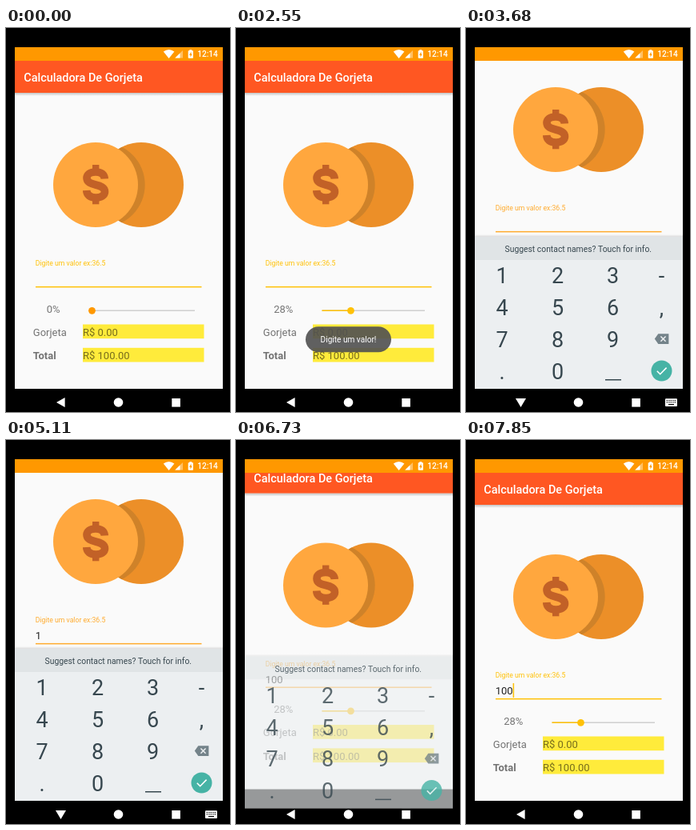
These frames come from a looping animation (280x480 px, 8000 ms). An HTML page with a canvas:

```html
<!DOCTYPE html>
<html lang="pt">
<head>
<meta charset="utf-8">
<title>Calculadora De Gorjeta</title>
<style>
  html, body { margin: 0; width: 100%; height: 100%; overflow: hidden; background: #000; }
  canvas { display: block; width: 280px; height: 480px; }
</style>
</head>
<body>
<canvas id="stage"></canvas>
<script>
const W = 280, H = 480, LOOP = 8000;
const AMBER = '#ffc107', ORANGE = '#ff9800', GREY = 'rgba(0,0,0,.54)', INK = '#37474f';
const canvas = document.getElementById('stage');
const ratio = window.devicePixelRatio || 1;
canvas.width = W * ratio;
canvas.height = H * ratio;
const c = canvas.getContext('2d');

// Timeline, in ms
const SLIDE_AT = 1170;
const OPEN_PAN = [3290, 3610], OPEN_KEYS = [3340, 3560];
const CLOSE_PAN = [6590, 6850], CLOSE_KEYS = [6640, 6820];
const TOAST_IN = [1240, 1740], TOAST_OUT = [3300, 3610];
const PAN = 69, KEYS_DROP = 19;
const CURSOR_ON = [[50, 550], [1050, 1550], [2050, 2550], [3050, 3620], [4120, 5110],
                   [5420, 6300], [6850, 7350], [7850, 8000]];
const PRESSES = [['1', 4490, 4610], ['0', 5300, 5420], ['0', 5740, 5800]];
const COLS = [45, 114.5, 183.5, 244.5], ROWS = [309.5, 349.5, 389, 429];
const KEYS = ['123-', '456,', '789 ', '.0  '];

const span = (t, [a, b]) => Math.min(1, Math.max(0, (t - a) / (b - a)));
const within = (t, [a, b]) => t >= a && t < b;
const mix = (a, b, u) => a + (b - a) * u;

function rect(x, y, w, h, fill) {
  c.fillStyle = fill;
  c.fillRect(x, y, w, h);
}

function disc(x, y, r, fill) {
  c.fillStyle = fill;
  c.beginPath();
  c.arc(x, y, r, 0, Math.PI * 2);
  c.fill();
}

function round(x, y, w, h, r, fill) {
  c.fillStyle = fill;
  c.beginPath();
  c.roundRect(x, y, w, h, r);
  c.fill();
}

function poly(fill, ...pts) {
  c.fillStyle = fill;
  c.beginPath();
  pts.forEach(([x, y]) => c.lineTo(x, y));
  c.closePath();
  c.fill();
}

function line(color, width, ...pts) {
  c.strokeStyle = color;
  c.lineWidth = width;
  c.beginPath();
  pts.forEach(([x, y]) => c.lineTo(x, y));
  c.stroke();
}

function text(s, x, y, size, fill, align = 'left', weight = 400) {
  c.font = `${weight} ${size}px Roboto, sans-serif`;
  c.textAlign = align;
  c.fillStyle = fill;
  c.fillText(s, x, y);
}

function shade(y, h, alpha) {
  const g = c.createLinearGradient(0, y, 0, y + h);
  const down = h > 0;
  g.addColorStop(0, `rgba(0,0,0,${alpha})`);
  g.addColorStop(1, 'rgba(0,0,0,0)');
  rect(11, down ? y : y + h, 260, Math.abs(h), g);
}

function statusBar() {
  rect(11, 24, 260, 17, ORANGE);
  c.fillStyle = '#fff';
  c.beginPath();
  c.moveTo(203.6, 38);
  c.lineTo(196.8, 29.6);
  c.quadraticCurveTo(203.6, 24.6, 210.4, 29.6);
  c.fill();
  poly('rgba(255,255,255,.4)', [221, 28], [221, 37.6], [211.3, 37.6]);
  poly('#fff', [217.5, 31.5], [217.5, 37.6], [211.3, 37.6]);
  rect(229.3, 27.2, 3, 2, '#fff');
  round(227.7, 28.2, 6.3, 9.6, .8, '#fff');
  poly(ORANGE, [231.4, 29.8], [229, 33.7], [230.5, 33.7], [230.5, 36.4], [232.8, 32.5], [231.4, 32.5]);
  text('12:14', 239.2, 36.4, 10.1, '#fff', 'left', 500);
}

function navBar(typing) {
  if (typing) {
    poly('#fff', [62, 463], [75, 463], [68.5, 474]);
    round(249, 463.3, 15, 9.6, 1, '#fff');
    for (let row = 0; row < 2; row++)
      for (let i = 0; i < 5; i++) rect(250.7 + i * 2.5, 465 + row * 2.3, 1.3, 1.2, '#000');
    rect(253, 470, 7, 1.2, '#000');
  } else {
    poly('#fff', [63, 468], [73.6, 462], [73.6, 474]);
  }
  disc(140.5, 468, 5.8, '#fff');
  rect(207.3, 463, 10.6, 10.6, '#fff');
}

function coins() {
  disc(169, 196, 53, '#ec8f28');
  c.save();
  c.beginPath();
  c.arc(169, 196, 53, 0, Math.PI * 2);
  c.clip();
  disc(120.7, 196, 53, '#cf8229');
  c.restore();
  disc(112, 196, 53, '#ffa73e');
  const brown = '#c26127';
  c.strokeStyle = brown;
  c.lineWidth = 9.6;
  c.stroke(new Path2D('M123.3 188.5C123 183 119 180 112 180C105 180 101 183.3 101 187.6' +
    'C101 193 106 194.6 112 196C118 197.4 123.5 199.2 123.5 204.8' +
    'C123.5 209 119 212 112.5 212C105 212 101 208.7 100.7 203'));
  rect(108, 171, 8.4, 8, brown);
  rect(108, 212, 8.4, 8.3, brown);
}

function field(t, value) {
  const tint = t >= 3050 && t < 6850 ? '#ffab2e' : AMBER;
  text('Digite um valor ex:36.5', 36.7, 297.2, 8.67, tint);
  text(value, 36.7, 318.2, 13, 'rgba(0,0,0,.87)');
  rect(37, 322.9, 207.5, 1.5, tint);
  if (CURSOR_ON.some(s => within(t, s))) {
    c.font = '400 13px Roboto, sans-serif';
    rect(36.7 + c.measureText(value).width, 304, 1.5, 18, tint);
  }
}

function slider(percent) {
  const x = 107.5 + 128.5 * percent / 100;
  text(percent + '%', 59.2, 355.7, 13, GREY, 'center');
  rect(107.5, 352.5, 128.5, 1.5, '#cfcfcf');
  rect(107.5, 352.5, x - 107.5, 1.5, AMBER);
  disc(x, 353.3, 4.4, percent ? AMBER : ORANGE);
}

function result(label, amount, y, weight) {
  text(label, 33.8, y + 4.8, 13, GREY, 'left', weight);
  rect(96, y - 9.5, 151.5, 17.7, '#ffeb3b');
  text(amount, 96, y + 4.8, 13, GREY);
}

function app(t, pan) {
  c.save();
  c.beginPath();
  c.rect(11, 41, 260, 410);
  c.clip();
  c.translate(0, -pan);
  rect(11, 41, 260, 410, '#fafafa');
  shade(81, 4, .22);
  rect(11, 41, 260, 40, '#ff5722');
  text('Calculadora De Gorjeta', 22.2, 67, 14.44, '#fff', 'left', 500);
  coins();
  field(t, PRESSES.filter(p => t >= p[2]).map(p => p[0]).join(''));
  slider(t < SLIDE_AT ? 0 : 28);
  result('Gorjeta', 'R$ 0.00', 380, 400);
  result('Total', 'R$ 100.00', 409.3, 700);
  c.restore();
}

function keyboard(t, drop, alpha) {
  c.save();
  c.translate(0, drop);
  c.globalAlpha = alpha;
  shade(261, -3, .12);
  rect(11, 261, 260, 29, '#e0e4e6');
  rect(11, 290, 260, 161, '#eceff1');
  c.globalAlpha = Math.min(1, alpha * 1.25);
  text('Suggest contact names? Touch for info.', 140.3, 280.4, 10.37, INK, 'center');

  const held = PRESSES.find(p => within(t, [p[1], p[2]]));
  KEYS.forEach((row, r) => [...row].forEach((key, i) => {
    if (held && held[0] === key) round(COLS[i] - 32, ROWS[r] - 15, 64.5, 29, 2, '#cfd8dc');
    text(key, COLS[i], ROWS[r] + 9.5, 27, INK, 'center');
  }));
  rect(174, 439, 20, 1.5, INK);

  poly('#74838a', [235.8, 388.6], [240.3, 382.2], [253.4, 382.2], [253.4, 395], [240.3, 395]);
  line('#eceff1', 1.5, [243.4, 385.5], [249.6, 391.7]);
  line('#eceff1', 1.5, [249.6, 385.5], [243.4, 391.7]);
  disc(244.5, 428.5, 13, '#46b3a5');
  line('#fff', 1.6, [238.8, 428.8], [242.7, 432.7], [250.6, 424.6]);
  c.restore();
}

function toast(alpha) {
  c.save();
  c.globalAlpha = alpha;
  round(87, 373.3, 107, 32, 16, 'rgba(82,82,82,.91)');
  text('Digite um valor!', 140.5, 393, 10.11, '#fff', 'center');
  c.restore();
}

function draw(t) {
  const opening = t < 5000;
  const pan = opening
    ? PAN * (1 - (1 - span(t, OPEN_PAN)) ** 2)
    : PAN * (1 - span(t, CLOSE_PAN)) ** 2;
  const u = span(t, opening ? OPEN_KEYS : CLOSE_KEYS);
  const drop = KEYS_DROP * (opening ? (1 - u) ** 1.5 : u);
  const alpha = opening ? 1 - (1 - u) ** 3 : 1 - u ** 1.5;

  c.setTransform(ratio, 0, 0, ratio, 0, 0);
  rect(0, 0, W, H, '#000');
  app(t, pan);
  if (opening && within(t, OPEN_PAN) && alpha > 0) rect(11, 441, 260, 2.6, '#fff');
  statusBar();
  navBar(within(t, [OPEN_KEYS[0], CLOSE_KEYS[0]]));
  if (alpha > 0) keyboard(t, drop, alpha);
  const shown = span(t, TOAST_IN) * (1 - span(t, TOAST_OUT) ** 2);
  if (shown > 0) toast(shown);
}

const start = performance.now();
function frame() {
  draw((performance.now() - start) % LOOP);
  requestAnimationFrame(frame);
}
frame();
</script>
</body>
</html>
```
